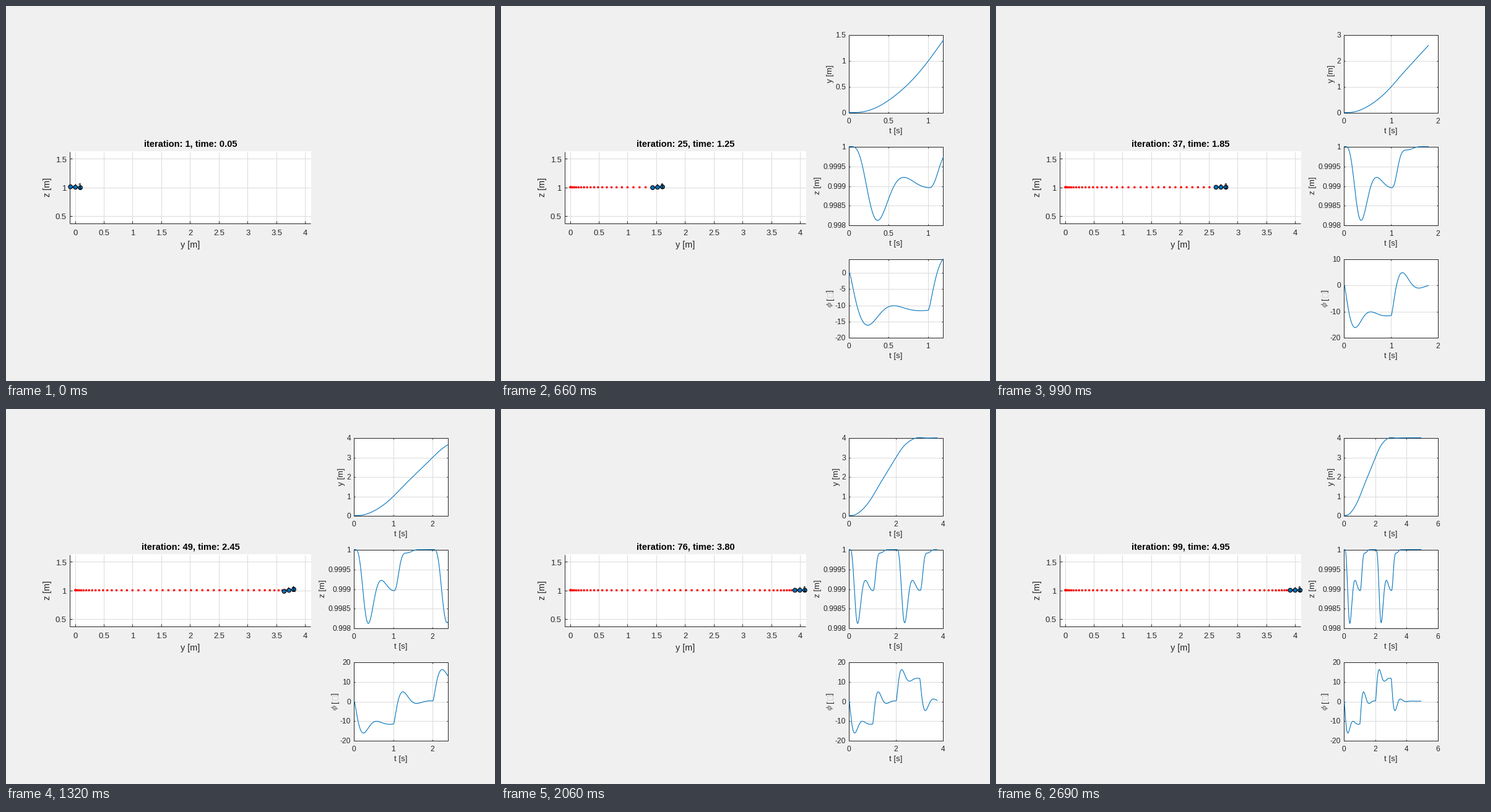
Recreate the animation shown at these times as a matplotlib script. Size 790 px wide and 607 px high, loop 2790 ms.

```python
import math

import numpy as np
import matplotlib.pyplot as plt
from matplotlib.animation import FuncAnimation
from matplotlib.collections import LineCollection, PathCollection
from matplotlib.patches import Rectangle
from matplotlib.path import Path

W, H, DPI = 790, 607, 100
PT = 72 / DPI                      # points per pixel
INK, GRID, BLUE = "#262626", "#dbdbdb", "#0072bd"
plt.rcParams["font.family"] = "Liberation Sans"

# --- planar quadrotor simulation ---------------------------------------
G, ARM = 9.81, 0.086
KP_Y, KV_Y = 10, 10
KP_Z, KV_Z = 200, 20
KP_PHI, KV_PHI = 1000, 100


def desired(t):
    """Position, velocity and acceleration of the reference path."""
    if t < 1:
        return t * t, 2 * t, 2
    if t < 2:
        return 2 * t - 1, 2, 0
    if t < 3:
        s = 3 - t
        return 4 - s * s, 2 * s, -2
    return 4, 0, 0


def simulate(end=5.0, dt=0.0005, keep=20):
    """States (y, z, phi), one row every 0.01 s."""
    y = vy = vz = phi = w = 0.0
    z = 1.0
    rows = []
    for k in range(round(end / dt) + 1):
        if k % keep == 0:
            rows.append((y, z, phi))
        yd, vd, ad = desired(k * dt)
        thrust = G - KV_Z * vz + KP_Z * (1 - z)
        goal = -(ad + KV_Y * (vd - vy) + KP_Y * (yd - y)) / G
        vy -= thrust * math.sin(phi) * dt
        vz += (thrust * math.cos(phi) - G) * dt
        w += (KP_PHI * (goal - phi) - KV_PHI * w) * dt
        y += vy * dt
        z += vz * dt
        phi += w * dt
    return np.array(rows)


states = simulate()
times = np.arange(len(states)) * 0.01

# --- stage in pixel units ----------------------------------------------
fig = plt.figure(figsize=(W / DPI, H / DPI), dpi=DPI, facecolor="#f0f0f0")
ax = fig.add_axes([0, 0, 1, 1])
ax.set_xlim(0, W)
ax.set_ylim(H, 0)
ax.axis("off")


def label(x, y, s="", size=13, color=INK, ha="center", va="baseline", **kw):
    return ax.text(x, y, s, fontsize=size * PT, color=color, ha=ha, va=va, **kw)


def lines(segments=(), color=INK, z=2):
    return ax.add_collection(LineCollection(
        segments, colors=color, linewidths=PT, zorder=z), autolim=False)


def white(x0, y0, x1, y1):
    return ax.add_patch(Rectangle((x0, y0), x1 - x0, y1 - y0, fc="white",
                                  lw=0, zorder=0))


def discs(fill, edge, width, z):
    return ax.add_collection(PathCollection(
        [], facecolors=fill, edgecolors=edge, linewidths=width * PT, zorder=z),
        autolim=False)


def circles(xs, ys, r):
    return [Path.circle((x, y), r) for x, y in zip(xs, ys)]


def snap(x, y):
    """Corner that the renderer rounds to the pixel holding (x, y)."""
    return math.floor(x), math.floor(y) + 1


def vline(x, y0, y1):
    return [snap(x, y0), snap(x, y1)]


def hline(y, x0, x1):
    return [snap(x0, y), snap(x1, y)]


# --- main view ----------------------------------------------------------
LEFT, RIGHT, TOP, BOTTOM = 103.5, 492.5, 235, 351.5
SCALE = 92.85


def main_x(y):
    return 112.1 + SCALE * y


def main_y(z):
    return 293.35 - SCALE * (z - 1)


def build_main():
    white(LEFT, TOP, RIGHT + 0.5, BOTTOM)
    grid = []
    axis = [vline(LEFT, TOP, BOTTOM), hline(BOTTOM, LEFT, RIGHT)]
    for v in np.arange(0, 4.1, 0.5):
        x = main_x(v)
        grid.append(vline(x, TOP, BOTTOM))
        axis.append(vline(x, BOTTOM - 4, BOTTOM))
        label(x, 371, f"{v:g}")
    for v in (0.5, 1, 1.5):
        y = main_y(v)
        grid.append(hline(y, LEFT, RIGHT))
        axis.append(hline(y, LEFT, LEFT + 4))
        label(97.5, y + 5.7, f"{v:g}", ha="right")
    lines(grid, GRID, 1)
    lines(axis)
    label(298, 390.5, "y [m]", 14.4)
    label(67, 293, "z [m]", 14.4, va="center", rotation=90)


build_main()
title = label(298, 228, size=14.67, color="black", weight="bold")
trail = discs("red", "none", 0, 4)
body, = ax.plot([], [], color="black", lw=1.3 * PT, zorder=5)
mast, = ax.plot([], [], color="black", lw=1.3 * PT, zorder=5)
rotors = discs(BLUE, "black", 1.1, 6)
tag = label(0, 0, "1", color="black", zorder=7)


def draw_robot(n):
    y, z, phi = states[5 * n]
    cx, cy = main_x(y), main_y(z)
    c, s = math.cos(phi), math.sin(phi)
    reach = ARM * SCALE * np.array([-1, 0, 1])
    xs, ys = cx + reach * c, cy - reach * s
    body.set_data(xs, ys)
    rotors.set_paths(circles(xs, ys, 3.3))
    mast.set_data([cx, cx - 4.4 * s], [cy, cy - 4.4 * c])
    tag.set_position((cx + 6.7, cy + 2.8))
    past = states[0:5 * n:5]
    trail.set_paths(circles(main_x(past[:, 0]), main_y(past[:, 1]), 1.8))
    title.set_text(f"iteration: {n}, time: {n * 0.05:.2f}")


# --- history plots ------------------------------------------------------
def nice(lo, hi, density):
    """Axis limits and ticks; a limit moves to the next tick if it is near."""
    span = hi - lo
    power = 10.0 ** math.floor(math.log10(span / density))
    step = next(m * power for m in (1, 2, 5, 10, 20)
                if span / (m * power) <= density)
    first = math.floor(lo / step + 0.02) * step
    last = math.ceil(hi / step - 0.02) * step
    if lo - first < 0.253 * span:
        lo = first
    if last - hi < 0.253 * span and (last - lo) / step < 4.5:
        hi = last
    ticks = step * np.arange(math.ceil(lo / step - 0.03),
                             math.floor(hi / step + 0.03) + 1)
    return lo, hi, ticks


def tick_name(v):
    return f"{round(v, 6) + 0.0:g}"


def text_width(s):
    return sum({".": 3.3, "-": 4}.get(c, 6.67) for c in s)


class Panel:
    L, R = 562.5, 714.5

    def __init__(self, top, bottom, data, name):
        self.top, self.bottom, self.data = top, bottom, data
        mid = (top + bottom) / 2
        self.grid = lines(color=GRID, z=1)
        self.frame = lines(z=2)
        self.curve, = ax.plot([], [], color=BLUE, lw=1.1 * PT, zorder=3)
        self.xnames = [label(0, bottom + 17, size=12) for _ in range(6)]
        self.ynames = [label(557, 0, size=12, ha="right") for _ in range(7)]
        self.names, self.box = [], None
        if name:
            self.names.append(label(0, mid, name, 13.2, va="center", rotation=90))
        else:
            self.names += [
                label(0, mid + 10, "\u03d5", 11.5, "#555555", va="center",
                      rotation=90, family="DejaVu Serif", style="italic"),
                label(0, mid + 1, "[", 13.2, va="center", rotation=90),
                label(0, mid - 12, "]", 13.2, va="center", rotation=90)]
            self.box = ax.add_patch(Rectangle(
                (0, mid - 9), 9, 7, fc="none", ec="#d2d2d2", lw=PT))
        self.parts = [white(self.L, top, self.R, bottom), self.grid, self.frame,
                      self.curve, label(638, bottom + 33.5, "t [s]", 13.2),
                      *self.xnames, *self.ynames, *self.names]
        if self.box:
            self.parts.append(self.box)

    def draw(self, n):
        count = 5 * (n - 1)
        for p in self.parts:
            p.set_visible(count > 0)
        if not count:
            return
        L, R, top, bottom = self.L, self.R, self.top, self.bottom
        t, v = times[:count], self.data[:count]
        t0, t1, xticks = nice(0, t[-1], 3.5)
        v0, v1, yticks = nice(v.min(), v.max(), 4.2)

        def px(a):
            return L + (R - L) * (a - t0) / (t1 - t0)

        def py(a):
            return bottom - (bottom - top) * (a - v0) / (v1 - v0)

        self.curve.set_data(px(t), py(v))
        grid = []
        frame = [vline(L, top, bottom), vline(R, top, bottom),
                 hline(top, L, R), hline(bottom, L, R)]
        for a in xticks:
            x = px(a)
            grid.append(vline(x, top, bottom))
            frame += [vline(x, top, top + 2), vline(x, bottom - 2, bottom)]
        for a in yticks:
            y = py(a)
            grid.append(hline(y, L, R))
            frame += [hline(y, L, L + 2), hline(y, R - 2, R)]
        self.grid.set_segments(grid)
        self.frame.set_segments(frame)

        for i, text in enumerate(self.xnames):
            text.set_text(tick_name(xticks[i]) if i < len(xticks) else "")
            if i < len(xticks):
                text.set_x(px(xticks[i]) - 0.5)
        for i, text in enumerate(self.ynames):
            text.set_text(tick_name(yticks[i]) if i < len(yticks) else "")
            if i < len(yticks):
                text.set_y(py(yticks[i]) + 4.6)
        x = 549 - max(text_width(tick_name(a)) for a in yticks)
        for text in self.names:
            text.set_x(x)
        if self.box:
            self.box.set_x(x - 4.5)


panels = [Panel(46.5, 172.5, states[:, 0], "y [m]"),
          Panel(227.5, 354.5, states[:, 1], "z [m]"),
          Panel(409.5, 536.5, np.degrees(states[:, 2]), None)]

# --- timing: four iterations take 110 ms, three take 80 ms ---------------
TICK, LOOP = 10, 2790
jumps = np.full(25, 4)
jumps[[18, 22]] = 3
iterations = 1 + np.concatenate(([0], np.cumsum(jumps)))
starts = np.concatenate(([0], np.cumsum(np.where(jumps == 4, 110, 80))))


def update(i):
    step = np.searchsorted(starts, i * TICK, side="right") - 1
    n = int(iterations[step])
    draw_robot(n)
    for panel in panels:
        panel.draw(n)
    return []


anim = FuncAnimation(fig, update, frames=LOOP // TICK, interval=TICK,
                     init_func=lambda: update(0), repeat=True, blit=False)
plt.show()
```
